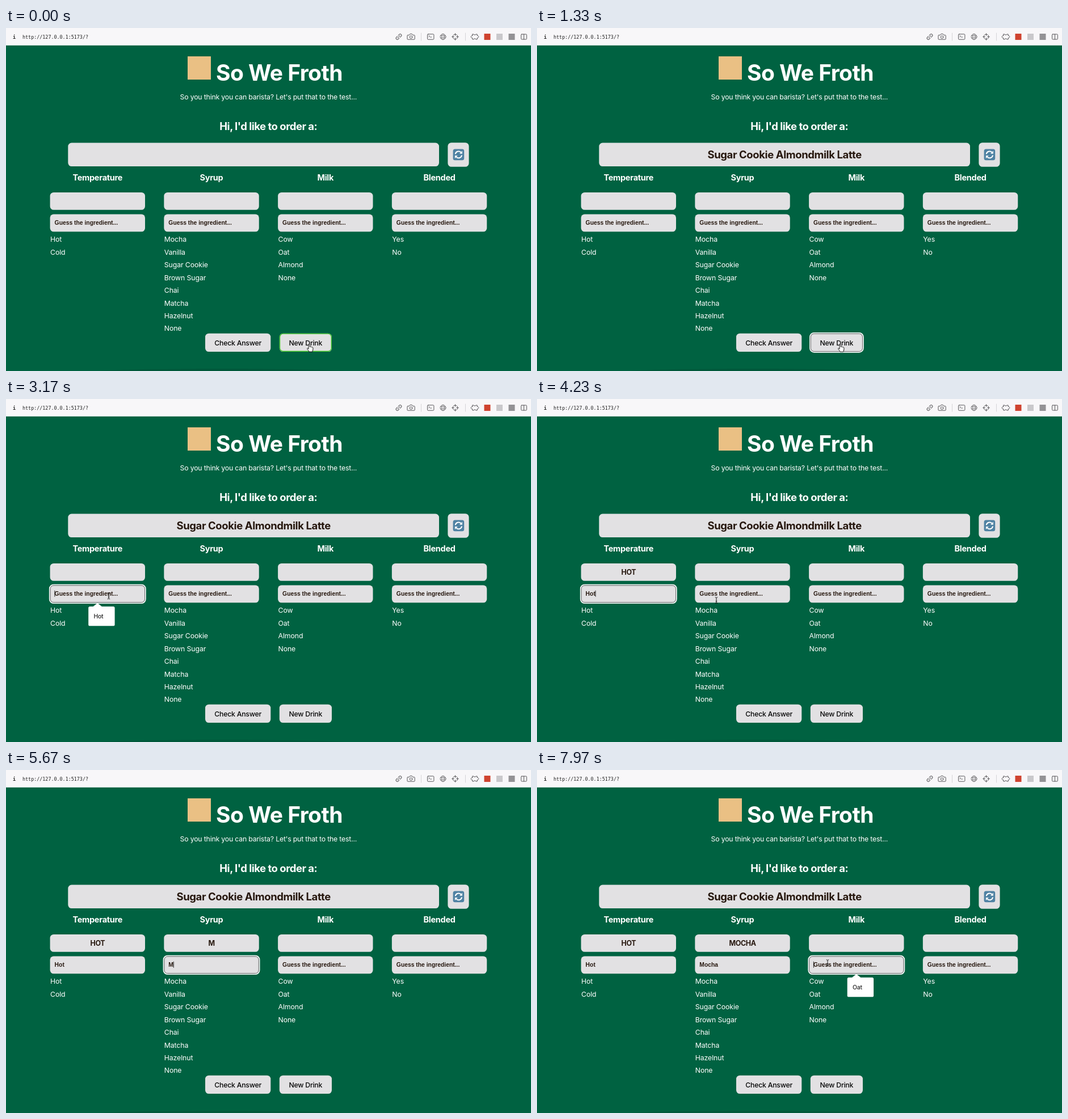
Recreate the animation shown at these times as an HTML page. Size 925 px wide and 605 px high, loop 8000 ms.

```html
<!DOCTYPE html>
<html lang="en">
<head>
<meta charset="utf-8">
<title>Barista quiz</title>
<style>
  html, body { margin: 0; width: 100%; height: 100%; overflow: hidden; background: #006241; }
  svg { display: block; width: 100%; height: 100%; }
  text { font-family: Inter, sans-serif; font-optical-sizing: none; fill: #fff; white-space: pre; }
  .mid { text-anchor: middle; }
  .title { font-size: 39px; font-weight: 700; letter-spacing: -.015em; }
  .tagline { font-size: 12.3px; letter-spacing: -.0155em; }
  .h2 { font-size: 18.5px; font-weight: 700; letter-spacing: -.027em; }
  .drink { letter-spacing: -.022em; }
  .h3 { font-size: 14.5px; font-weight: 700; letter-spacing: -.02em; }
  .item { font-size: 12.3px; letter-spacing: -.008em; }
  .answer { font-size: 12.5px; font-weight: 700; letter-spacing: -.035em; }
  .field { font: 700 10.35px "Liberation Sans", Arial, sans-serif; }
  .dark { fill: #27180f; }
  .label { font-size: 12.3px; font-weight: 500; letter-spacing: -.02em; fill: #080808; }
  .hint { font-size: 10.4px; font-weight: 500; letter-spacing: -.02em; fill: #222; }
  .url { font: 8.4px "DejaVu Sans Mono", monospace; fill: #222; }
  .info { font-weight: 700; }
  .box { fill: #e2e1e3; }
  .icons { fill: none; stroke: #58575a; stroke-width: 1; stroke-linecap: round; stroke-linejoin: round; }
  .fine { stroke-width: .75; }
  .cursor { fill: #fff; stroke: #000; stroke-width: .9; stroke-linejoin: round; }
</style>
</head>
<body>
<svg id="stage" viewBox="0 0 925 605">
  <rect width="925" height="605" fill="#006241"/>
  <ellipse cx="380" cy="606" rx="220" ry="5" opacity=".1"/>
  <rect width="925" height="30.5" fill="#f8f7f9"/>
  <rect y="30" width="925" height=".7" fill="#d3dad7"/>
  <text class="url info" x="12" y="19">i</text>
  <text class="url" x="29" y="19">http://127.0.0.1:5173/?</text>

  <g class="icons">
    <g transform="translate(692 15.5) rotate(-45)">
      <path d="M-1.2 -2.3H-3.6a2.3 2.3 0 0 0 0 4.6H-1.2M1.2 -2.3H3.6a2.3 2.3 0 0 1 0 4.6H1.2M-2.8 0H2.8"/>
    </g>
    <path d="M708 12.5h2.6l1.2-2h3.6l1.2 2h2.6a1 1 0 0 1 1 1v5.7a1 1 0 0 1-1 1h-11.2a1 1 0 0 1-1-1v-5.7a1 1 0 0 1 1-1z"/>
    <circle cx="713.6" cy="16" r="2.3"/>
    <path d="M731.5 9v13M809.5 9v13" stroke="#d5d4d7"/>
    <rect x="742.5" y="10.8" width="11.4" height="9.4" rx="1.4"/>
    <path d="M744.8 13.3l1.6 1.3-1.6 1.3M747.6 16h2"/>
    <g class="fine">
      <circle cx="770" cy="15.5" r="5"/>
      <ellipse cx="770" cy="15.5" rx="2.3" ry="5"/>
      <path d="M765.4 13.7h9.2M765.4 17.3h9.2"/>
    </g>
    <circle cx="791.5" cy="15.5" r="4.4"/>
    <path d="M791.5 9.7v3.6M791.5 17.7v3.6M785.7 15.5h3.6M793.7 15.5h3.6"/>
    <path d="M821.8 11h2.4a1.9 1.9 0 0 0 3.6 0h2.4v2.6a2 2 0 1 1 0 3.8v2.6h-2.4a1.9 1.9 0 0 0-3.6 0h-2.4v-2.6a2 2 0 1 1 0-3.8z"/>
    <rect x="907.6" y="11" width="9.8" height="9" rx="1.2"/>
    <path d="M912.5 11v9"/>
  </g>
  <rect x="842.5" y="10" width="11" height="11" fill="#cf432f"/>
  <rect x="864" y="10" width="11" height="11" fill="#c9c8cb"/>
  <rect x="885.5" y="10" width="11" height="11" fill="#939295"/>

  <rect x="320" y="50" width="41" height="41" fill="#eac084"/>
  <text class="title" x="370" y="93">So We Froth</text>
  <text class="tagline mid" x="462.4" y="126.4">So you think you can barista? Let's put that to the test...</text>
  <text class="h2 mid" x="462.3" y="180">Hi, I'd like to order a:</text>

  <rect class="box" x="109.3" y="202.6" width="653.7" height="41.5" rx="6.3"/>
  <text class="h2 drink mid dark" id="drink" x="436.2" y="230.4"></text>
  <rect class="box" x="778.4" y="202.2" width="37.2" height="42.6" rx="6.3"/>
  <g transform="translate(797.4 223.4)" fill="none" stroke="#fff" stroke-width="2">
    <rect x="-9.8" y="-9.8" width="19.6" height="19.6" rx="3.5" fill="#4f82a3" stroke="none"/>
    <path d="M-5.7 -1a5.8 5.8 0 0 1 9.8 -3.2M5.7 1a5.8 5.8 0 0 1-9.8 3.2"/>
    <path d="M6.5 -6.6v4.9h-4.9zM-6.5 6.6v-4.9h4.9z" fill="#fff" stroke="none"/>
  </g>

  <g id="columns"></g>
  <rect class="box" x="351" y="538.7" width="115.3" height="32.3" rx="6.3"/>
  <text class="label mid" x="408.6" y="559.5">Check Answer</text>
  <rect class="box" x="481.8" y="538.7" width="92.2" height="32.3" rx="6.3"/>
  <rect id="hover" x="482.5" y="539.4" width="90.8" height="30.9" rx="5.8" fill="none" stroke="#45c52c" stroke-width="1.4"/>
  <text class="label mid" x="527.8" y="559.5">New Drink</text>

  <g id="ring" fill="none">
    <rect stroke="#fff" stroke-width="1.8"/>
    <rect stroke="#444648" stroke-width=".8"/>
  </g>
  <rect id="caret" y="337.8" width=".9" height="11" fill="#111"/>
  <g id="tip">
    <path d="M-16 40.3V8.7a2.6 2.6 0 0 1 2.6-2.6H-7.6L0 0L7.6 6.1H27.8a2.6 2.6 0 0 1 2.6 2.6V37.7a2.6 2.6 0 0 1-2.6 2.6H-13.4a2.6 2.6 0 0 1-2.6-2.6z" fill="#fff"/>
    <text class="hint" x="-6.7" y="27.3"></text>
  </g>

  <g id="pointers" class="cursor">
    <path id="hand" d="M-2.9 -5.6c0-1.5 2.2-1.5 2.2 0v3.5c.5-.7 1.9-.5 2 .4c.5-.6 1.8-.3 1.9.5c.7-.4 1.7 0 1.7 1v2.7c0 1.7-1 2.3-1.1 4H-2.1c-.3-1.8-2.2-3.1-3.1-4.8c-.6-1.1.8-1.8 1.5-.9l.8.9z"/>
    <path id="beam" fill="none" d="M-2.2 -5.3q1.8 0 2.2 1q.4-1 2.2-1M0 -4.3V4.3M-2.2 5.3q1.8 0 2.2-1q.4 1 2.2 1M-1.3 1.8H1.3"/>
    <path id="arrow" d="M-3 -6v11.2l2.6-2.4l1.7 3.8l1.7-.8l-1.7-3.6h3.5z" fill="#000" stroke="#fff"/>
  </g>
</svg>

<script>
const LOOP = 8000, BLINK = 500, TIP_DELAY = 150;
const PLACEHOLDER = 'Guess the ingredient...';
const ORDER_AT = 700;
const BUTTON = { x: 481.8, y: 538.7, w: 92.2, h: 32.3 };

const columns = [
  { name: 'Temperature', items: 'Hot,Cold', focus: 2800, keys: [3480, 3620, 3750], word: 'Hot', tip: 'Hot' },
  { name: 'Syrup', items: 'Mocha,Vanilla,Sugar Cookie,Brown Sugar,Chai,Matcha,Hazelnut,None',
    focus: 4600, keys: [5600, 5780, 5940, 6100, 6300], word: 'Mocha' },
  { name: 'Milk', items: 'Cow,Oat,Almond,None', focus: 7700, keys: [], word: '', tip: 'Oat' },
  { name: 'Blended', items: 'Yes,No', focus: Infinity, keys: [], word: '' }
];

// Pointer moves: start, end, target x, target y
const moves = [
  [0, 0, 536, 564.5], [1850, 2650, 181, 347.5],
  [3930, 4210, 316, 355], [4350, 4550, 322, 346], [7200, 7620, 512, 340]
];

const $ = id => document.getElementById(id);
const show = (el, on) => el.setAttribute('visibility', on ? 'visible' : 'hidden');
const setText = (el, s) => { if (el.textContent !== s) el.textContent = s; };

function add(tag, attrs, text = '') {
  const el = document.createElementNS($('stage').namespaceURI, tag);
  for (const key in attrs) el.setAttribute(key, attrs[key]);
  el.textContent = text;
  return $('columns').appendChild(el);
}

columns.forEach((col, i) => {
  const x = 77.6 + i * 200.75, cx = x + 83.7;
  const box = { x, width: 167.4, rx: 6.3, class: 'box' };
  col.rect = { x, y: 328.4, w: 167.4, h: 30.9 };
  add('text', { class: 'h3 mid', x: cx, y: 269.2 }, col.name);
  add('rect', { ...box, y: 290, height: 30.8 });
  add('rect', { ...box, y: 328.4, height: 30.9 });
  col.answer = add('text', { class: 'answer mid dark', x: cx, y: 310.1 });
  col.input = add('text', { class: 'field dark', x: x + 8, y: 347.1 });
  col.items.split(',').forEach((item, row) =>
    add('text', { class: 'item', x: x + .4, y: 377.4 + row * 22.42 }, item));
});

function pointerAt(t) {
  let [, , x, y] = moves[0];
  for (const [start, end, tx, ty] of moves.slice(1)) {
    const p = Math.min(1, Math.max(0, (t - start) / (end - start)));
    const e = p * p * (3 - 2 * p);
    x += (tx - x) * e;
    y += (ty - y) * e;
  }
  return { x, y };
}

const inside = (p, r) => p.x > r.x && p.x < r.x + r.w && p.y > r.y && p.y < r.y + r.h;

function placeRing(r) {
  [...$('ring').children].forEach((el, i) => {
    const grow = i ? -.5 : .8;
    el.setAttribute('x', r.x - grow);
    el.setAttribute('y', r.y - grow);
    el.setAttribute('width', r.w + 2 * grow);
    el.setAttribute('height', r.h + 2 * grow);
    el.setAttribute('rx', 6.3 + grow);
  });
}

function render(t) {
  const ordered = t >= ORDER_AT;
  setText($('drink'), ordered ? 'Sugar Cookie Almondmilk Latte' : '');

  let active = null;
  for (const col of columns) {
    col.typed = col.word.slice(0, col.keys.filter(k => t >= k).length);
    setText(col.answer, col.typed.toUpperCase());
    setText(col.input, col.typed || PLACEHOLDER);
    if (t >= col.focus) active = col;
  }

  show($('ring'), ordered);
  placeRing(active ? active.rect : BUTTON);

  const lastKey = active ? Math.max(active.focus, ...active.keys.filter(k => t >= k)) : 0;
  show($('caret'), active && (t - lastKey) % (2 * BLINK) < BLINK);
  const tipOn = active && active.tip && !active.typed && t >= active.focus + TIP_DELAY;
  show($('tip'), tipOn);
  if (active) {
    const width = active.typed ? active.input.getComputedTextLength() : 0;
    $('caret').setAttribute('x', active.rect.x + 7.8 + width);
    $('tip').setAttribute('transform', `translate(${active.rect.x + 83.6} 360)`);
    setText($('tip').lastElementChild, active.tip || '');
  }

  // Typing hides the pointer until it moves again
  const p = pointerAt(t);
  const hidden = columns.some((col, i) => col.keys.length && t >= col.keys[0] && t < moves[i ? 4 : 2][0]);
  const overButton = inside(p, BUTTON);
  const overInput = columns.some(col => inside(p, col.rect));
  $('pointers').setAttribute('transform', `translate(${p.x} ${p.y})`);
  show($('hand'), !hidden && overButton);
  show($('beam'), !hidden && overInput);
  show($('arrow'), !hidden && !overButton && !overInput);
  show($('hover'), overButton && !ordered);
}

const origin = performance.now();
function tick() {
  render((performance.now() - origin) % LOOP);
  requestAnimationFrame(tick);
}
render(0);
requestAnimationFrame(tick);
</script>
</body>
</html>
```
